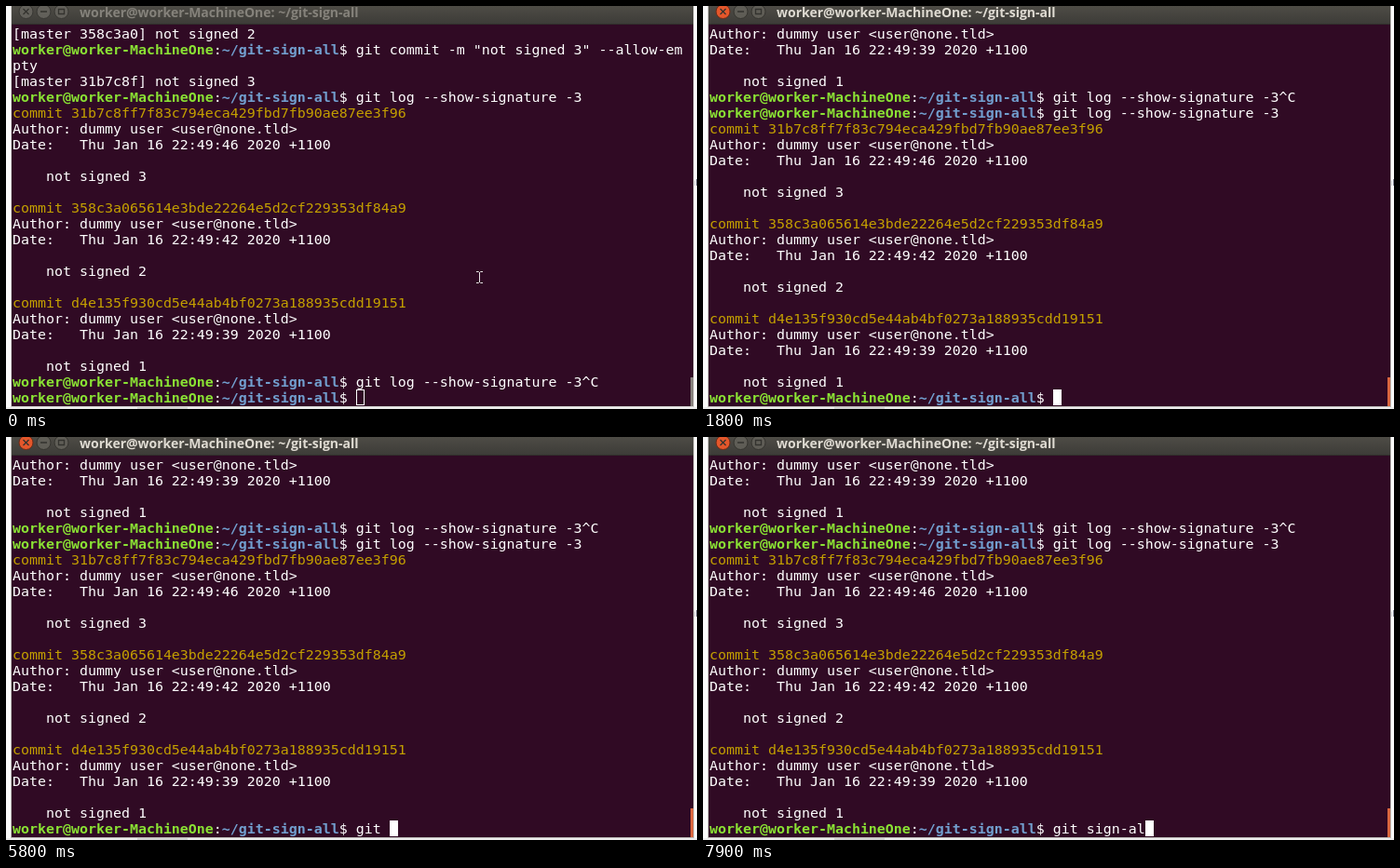
Animation of 742 by 433 pixels, one loop 8 s. Source, as an HTML page:

```html
<!DOCTYPE html>
<html lang="en">
<head>
<meta charset="utf-8">
<title>Terminal session</title>
<style>
  html, body { margin: 0; width: 100%; height: 100%; overflow: hidden; background: #fff; }
  svg { display: block; width: 742px; height: 433px; }
  text { white-space: pre; }
  .term { font: 14.95px "DejaVu Sans Mono", monospace; fill: #fff; }
  .user { fill: #8ae234; font-weight: bold; }
  .path { fill: #729fcf; font-weight: bold; }
  .hash { fill: #c4a000; }
  .title { font: bold 14px "Open Sans", "Noto Sans", sans-serif; fill: #dfdbd2; }
  .dim .title { fill: #85827b; }
  .button { fill: #5f5d56; stroke: #35342f; }
  .close { fill: #e4572b; stroke: #6b2a17; }
  .dim .button { fill: #62605a; stroke: #383733; }
  .glyph { fill: none; stroke: #33322e; stroke-width: 1.3; }
  .thumb { fill: #d9663f; }
  .dim .thumb { fill: #86807c; }
  .shadow { fill: #bdbbb8; }
  .dim .shadow { fill: #d5d4d2; }
</style>
</head>
<body>
<svg id="stage" viewBox="0 0 742 433">
  <defs>
    <linearGradient id="bar" x1="0" y1="0" x2="0" y2="1">
      <stop offset="0" stop-color="#4e4c46"/>
      <stop offset="1" stop-color="#3c3b37"/>
    </linearGradient>
  </defs>
  <rect width="742" height="433" fill="#fafafa"/>
  <rect y="431" width="742" height="2" fill="#ececec"/>
  <path d="M141 431h54v2h-54z" fill="#d2d2d2"/>
  <text x="733" y="193" font-family="Open Sans, sans-serif" font-size="13" fill="#3d4358">ar</text>
  <rect class="shadow" x="5" width="734" height="431"/>
  <rect x="6" width="732" height="430" fill="#300a24"/>
  <rect x="6" width="732" height="20" fill="url(#bar)"/>
  <rect x="6" y="19" width="732" height="1" fill="#302f2b"/>
  <circle class="button close" cx="21.5" cy="6" r="7.5"/>
  <circle class="button" cx="40.5" cy="6" r="7.5"/>
  <circle class="button" cx="59.5" cy="6" r="7.5"/>
  <path class="glyph" d="M18.5 3l6 6m0-6l-6 6M37 6h7M56.5 3.5h6v5h-6z"/>
  <text class="title" x="79" y="12">worker@worker-MachineOne: ~/git-sign-all</text>
  <rect class="thumb" x="735" y="399" width="3" height="31"/>
  <g id="rows" class="term"></g>
  <rect id="cursor" height="17"/>
  <path id="pointer" d="M505 285.5h2.5l1 1 1-1h2.500M508.500 286v11M505 297.500h2.500l1-1 1 1h2.500" fill="none" stroke="#e8e4e6"/>
</svg>
<script>
const LOOP = 8000, LEFT = 7, TOP = 21, CELL = 9, ROW = 17, COUNT = 24, PROMPT_COLS = 41;
const LOG = 'git log --show-signature -3';

const span = (cls, s) => `<tspan class="${cls}">${s}</tspan>`;
const prompt = cmd =>
  span('user', 'worker@worker-MachineOne') + ':' + span('path', '~/git-sign-all') + '$ ' + cmd;
const commit = (hash, sec, n) => [
  span('hash', 'commit ' + hash),
  'Author: dummy user &lt;user@none.tld&gt;',
  `Date:   Thu Jan 16 22:49:${sec} 2020 +1100`,
  '',
  '    not signed ' + n
];
const history = [
  ...commit('31b7c8ff7f83c794eca429fbd7fb90ae87ee3f96', 46, 3), '',
  ...commit('358c3a065614e3bde22264e5d2cf229353df84a9', 42, 2), '',
  ...commit('d4e135f930cd5e44ab4bf0273a188935cdd19151', 39, 1)
];
const before = [
  '[master 358c3a0] not signed 2',
  prompt('git commit -m "not signed 3" --allow-em'),
  'pty',
  '[master 31b7c8f] not signed 3',
  prompt(LOG),
  ...history,
  prompt(LOG + '^C')
];
const after = [...before, prompt(LOG), ...history];

// time, typed command, cursor visible
const steps = [
  [0, '', 1], [800, LOG, 1], [1400, LOG, 0],
  [1800, '', 1], [2400, '', 0], [3400, '', 1], [3700, '', 0],
  [4200, 'g', 1], [4300, 'gi', 1], [4600, 'git', 1],
  [5000, 'git ', 1], [5500, 'git ', 0], [5800, 'git ', 1],
  [5900, 'git s', 1], [6000, 'git si', 1], [6200, 'git sig', 1],
  [6400, 'git sign', 1], [7000, 'git sign', 0],
  [7400, 'git sign-', 1], [7600, 'git sign-a', 1], [7900, 'git sign-al', 1]
];
const FOCUS = 400, HIDE_POINTER = 700, OUTPUT = 1800;

const $ = id => document.getElementById(id);
const stage = $('stage'), rows = $('rows'), cursor = $('cursor'), pointer = $('pointer');
const set = (el, attrs) => Object.entries(attrs).forEach(([k, v]) => el.setAttribute(k, v));
let shown = '';

function draw(t) {
  const [, cmd, on] = steps.findLast(s => s[0] <= t);
  const focused = t >= FOCUS;
  const key = [cmd, on, focused, t >= HIDE_POINTER, t >= OUTPUT].join('|');
  if (key === shown) return;
  shown = key;

  const lines = [...(t < OUTPUT ? before : after), prompt(cmd)].slice(-COUNT);
  rows.innerHTML = lines.map((s, i) =>
    `<text x="${LEFT}" y="${TOP + i * ROW + 14}">${s}</text>`).join('');

  const x = LEFT + (PROMPT_COLS + cmd.length) * CELL;
  const y = TOP + (COUNT - 1) * ROW;
  set(cursor, focused
    ? { x, y, width: CELL, height: ROW, fill: '#fff', stroke: 'none' }
    : { x: x + .5, y: y + .5, width: CELL - 1, height: ROW - 1, fill: 'none', stroke: '#fff' });
  cursor.style.display = on ? '' : 'none';
  pointer.style.display = t < HIDE_POINTER ? '' : 'none';
  stage.classList.toggle('dim', !focused);
}

const start = performance.now();
function tick() {
  draw((performance.now() - start) % LOOP);
  requestAnimationFrame(tick);
}
tick();
</script>
</body>
</html>
```
